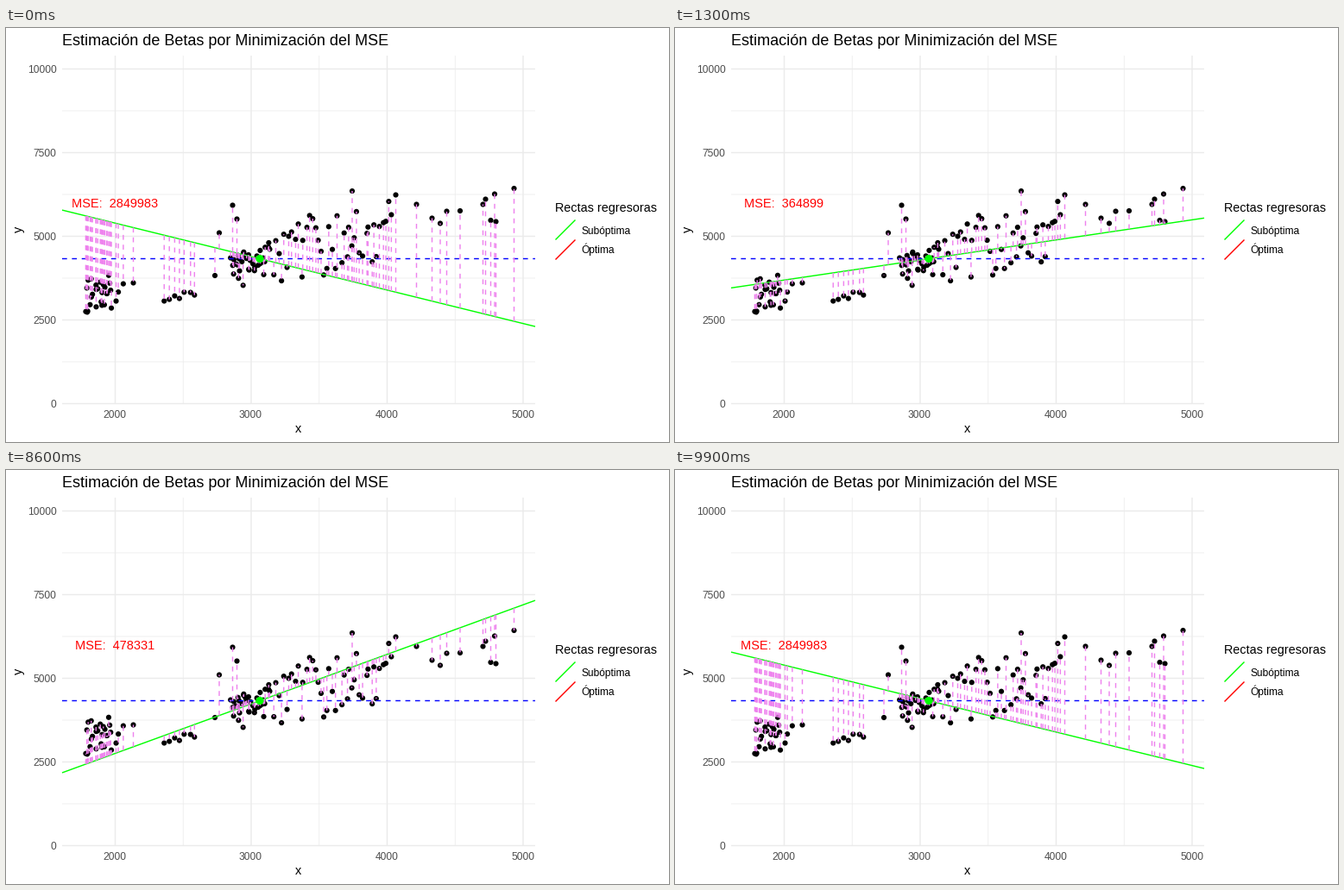
A matplotlib script that plays this animation: 768x480 px, repeating every 10 s.

```python
import math

import numpy as np
import matplotlib.pyplot as plt
from matplotlib.animation import FuncAnimation
from matplotlib.collections import LineCollection, PatchCollection
from matplotlib.patches import Circle

plt.rcParams["font.family"] = "Liberation Sans"

PT = 0.72                          # points per pixel at 100 dpi
LINE = 1.42 * PT
DASHED = (0, (4, 4))
LEFT, RIGHT, TOP, BOTTOM = 64.5, 612.5, 31.5, 435.5
PIVOT_X, PIVOT_Y = 293.5, 267.0
X_UNIT, Y_UNIT = 0.1575, 0.0388    # pixels per data unit
GREEN = "#00ff00"
FRAMES = 100
BEST = 24                          # step at which the line rests
BEST_SLOPE = 0.92
rng = np.random.default_rng(5)


def x_px(value):
    return 126 + (value - 2000) * X_UNIT


def y_px(value):
    return 435 - value * Y_UNIT


def fitted(x, slope):
    return PIVOT_Y - slope * Y_UNIT / X_UNIT * (x - PIVOT_X)


def cloud(count, x0, x1, spread, offset=0):
    """Points scattered evenly about the best line between x0 and x1."""
    xs = np.linspace(x0, x1, count) + rng.uniform(-1.5, 1.5, count)
    ys = fitted(xs, BEST_SLOPE) + offset + rng.uniform(-spread, spread, count)
    return np.column_stack([xs, ys])


outliers = [(147, 295), (241.5, 286.5), (246.5, 237), (262, 205), (267, 221),
            (400.5, 188.5), (451, 193), (475, 204), (493, 220), (502.5, 226),
            (510, 212), (525.5, 211.5), (552, 204), (555, 198), (561, 222.5),
            (565.5, 192), (567, 224), (588, 185.5)]
points = np.vstack([
    cloud(25, 91, 121, 21),
    cloud(4, 122, 134, 13),
    cloud(7, 182, 219, 5, offset=22),
    cloud(30, 260, 304, 12),
    cloud(9, 264, 310, 30),
    cloud(42, 312, 446, 37),
    outliers,
])

fig = plt.figure(figsize=(7.68, 4.8), dpi=100, facecolor="white")
ax = fig.add_axes([0, 0, 1, 1])
ax.set_xlim(-0.5, 767.5)
ax.set_ylim(479.5, -0.5)
ax.axis("off")


def line(xs, ys, color, width=LINE, **kw):
    return ax.plot(xs, ys, color=color, lw=width, snap=False,
                   solid_capstyle="butt", dash_capstyle="butt", **kw)[0]


def label(x, y, text, size, color="black", **kw):
    return ax.text(x, y, text, fontsize=size * PT, color=color, **kw)


def dots(centres, radius, color, zorder):
    ax.add_collection(PatchCollection(
        [Circle(c, radius) for c in centres], facecolor=color, linewidth=0,
        snap=False, zorder=zorder), autolim=False)


def draw_grid():
    grey, text = "#ebebeb", "#4d4d4d"
    for x in map(x_px, range(2500, 5000, 1000)):
        line([x, x], [TOP, BOTTOM], grey, LINE / 2, zorder=1)
    for y in map(y_px, range(1250, 10000, 2500)):
        line([LEFT, RIGHT], [y, y], grey, LINE / 2, zorder=1)
    for value in range(2000, 5001, 1000):
        x = x_px(value)
        line([x, x], [TOP, BOTTOM], grey, zorder=1)
        label(x - 0.5, 452, str(value), 12, text, ha="center")
    for value in range(0, 10001, 2500):
        y = y_px(value)
        line([LEFT, RIGHT], [y, y], grey, zorder=1)
        label(58, y + 4.3, str(value), 12, text, ha="right")


def draw_legend():
    label(636, 212.7, "Rectas regresoras", 14.4)
    for y, color, text in ((245, GREEN, "Subóptima"), (268, "red", "Óptima")):
        line([636, 659], [y, y - 23], color)
        label(666, y - 7, text, 12)


draw_grid()
draw_legend()
label(64.5, 20, "Estimación de Betas por Minimización del MSE", 18)
label(338, 468.5, "x", 14.5, ha="center")
label(14, 233, "y", 14.5, rotation=90, ha="center", va="center")

dots(points, 3.08, "black", 3)
line([LEFT, RIGHT], [PIVOT_Y, PIVOT_Y], "blue", ls=DASHED, zorder=3.5)
fit_line = line([LEFT, RIGHT], [0, 0], "red", zorder=4)
residuals = LineCollection([], colors="violet", linewidths=LINE,
                           linestyles=[DASHED], capstyle="butt",
                           snap=False, zorder=5)
ax.add_collection(residuals, autolim=False)
dots([(PIVOT_X, PIVOT_Y)], 4.6, GREEN, 6)
mse_text = label(126, 207.5, "", 14.5, "red", ha="center", zorder=7)


def step_at(frame):
    """Position in the sweep of slopes, resting at the best one."""
    if frame == FRAMES - 1:
        return 0
    if frame < 82:
        return min(BEST, math.ceil(frame * 150 / 99))
    return math.floor(25.5 + 1.5 * (frame - 82))


def mse_at(step):
    return 284180.25 + 4340.843 * (step - BEST - 0.31222) ** 2


def update(frame):
    step = step_at(frame)
    slope = -1 + 0.08 * step
    fit_line.set_ydata([fitted(LEFT, slope), fitted(RIGHT, slope)])
    fit_line.set_color("red" if 17 <= frame <= 82 else GREEN)
    residuals.set_segments([[(x, fitted(x, slope)), (x, y)]
                            for x, y in points])
    mse_text.set_text(f"MSE:  {mse_at(step):.0f}")
    return fit_line, residuals, mse_text


anim = FuncAnimation(fig, update, frames=FRAMES, interval=100,
                     repeat=True, repeat_delay=0, blit=False)
plt.show()
```
